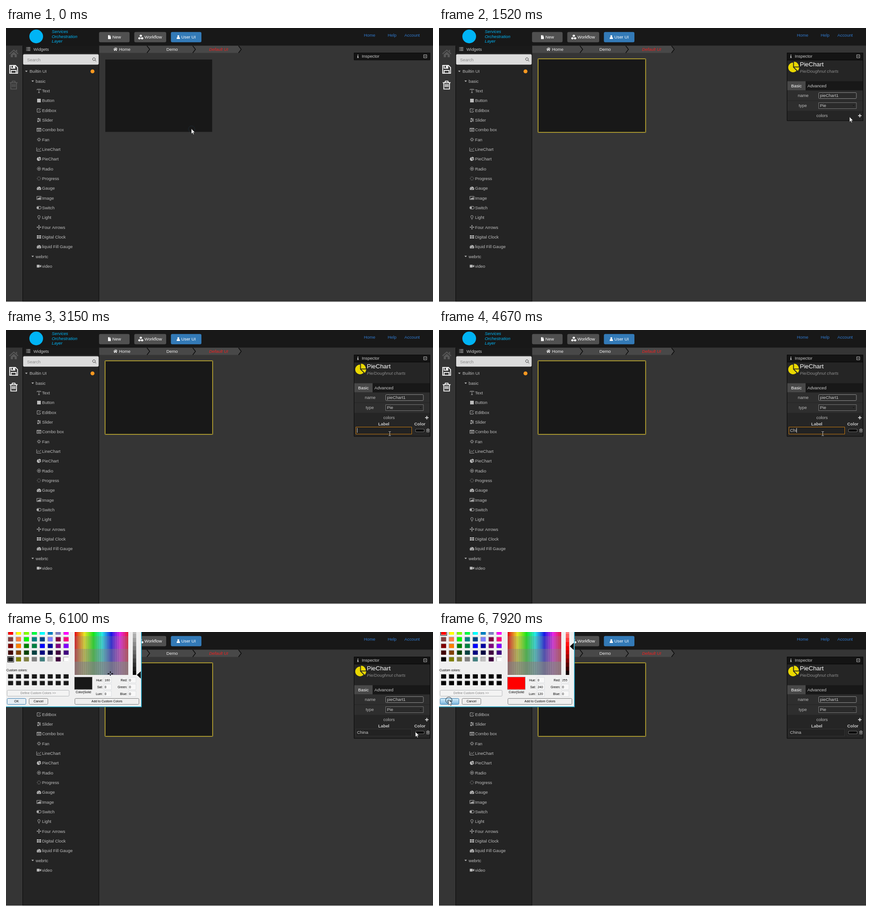
Recreate the animation shown at these times as an HTML page with a canvas. Size 933x600 px, loop 8 s.

```html
<!DOCTYPE html>
<html lang="en">
<head>
<meta charset="utf-8">
<title>Widget editor</title>
<style>
html, body { margin: 0; width: 100%; height: 100%; overflow: hidden; background: #353535; }
canvas { display: block; }
</style>
</head>
<body>
<canvas id="stage" width="933" height="600"></canvas>
<script>
const ctx = document.getElementById('stage').getContext('2d');
const LOOP = 8000;

// Icons are centred on 0,0 and about 10 px wide: [filled path, stroked path]
const spokes = 'M0-4.3V-2.8M0 2.8V4.3M-4.3 0h1.5M2.8 0h1.5M-3-3l1 1M2 2l1 1M-3 3l1-1M2-2l1-1';
const gauge = ['M-4.2 3.5A4.8 4.8 0 1 1 4.2 3.5ZM-.8 2.5h1.6L1.5-1.5ZM-3.6 0h1.2v1.2h-1.2zM2.4 0h1.2v1.2H2.4zM-2-2.8h1.2v1.2H-2z', ''];
const icons = {
  text: ['', 'M-4-3.5H4M0-3.5V4M-4-3.5v2M4-3.5v2M-2 4H2'],
  button: ['M-4-4H4V4H-4Z', ''],
  edit: ['', 'M2-3.5H-4V4H3V1M-1 1.5L4.5-4'],
  slider: ['M-2-4.4h2v2.8h-2zM1-1.4h2v2.8h-2zM-3 1.6h2v2.8h-2z', 'M-4-3H4M-4 0H4M-4 3H4'],
  combo: ['', 'M-4.5-3.5h9v7h-9zM-4.5-2.5h9M-3-.3h6M-3 1.6h6'],
  fan: ['', spokes + 'M2.3 0A2.3 2.3 0 1 1 2.3-.01'],
  line: ['', 'M-5-4V4H5M-3.5 1.5L-1-1 1 1 4.5-3'],
  pie: ['M-.5 0L2.4 2.9A4.1 4.1 0 1 1-.5-4.1ZM.5 0H4.6A4.1 4.1 0 0 1 3.4 2.9ZM4.3-.7H.2V-4.8A4.1 4.1 0 0 1 4.3-.7Z', ''],
  radio: ['M1.5 0A1.5 1.5 0 1 1 1.5-.01Z', 'M3.7 0A3.7 3.7 0 1 1 3.7-.01'],
  progress: ['', spokes],
  gauge,
  image: ['M-3.5 2.5L-1.5-.5 0 1 2-2 3.5 0V2.5Z', 'M-4.7-3.5h9.4v7h-9.4z'],
  switch: ['M0 0A2.2 2.2 0 1 1 0-.01Z', 'M-2-3H2A3 3 0 0 1 2 3H-2A3 3 0 0 1-2-3'],
  light: ['', 'M-1.2 2C-1.2.5-2.6 0-2.6-1.7A2.6 2.6 0 0 1 2.6-1.7C2.6 0 1.2.5 1.2 2ZM-1 4H1'],
  arrows: ['M0-5l1.8 2h-3.6zM0 5l1.8-2h-3.6zM-5 0l2 1.8v-3.6zM5 0l-2 1.8v-3.6z', 'M-4 0H4M0-4V4'],
  clock: ['M-4.5-3.5h4v3h-4zM.5-3.5h4v3h-4zM-4.5.5h4v3h-4zM.5.5h4v3h-4z', ''],
  video: ['M-4.7-3h6.2v6h-6.2zM1.8-.5L4.8-3V3L1.8.5z', ''],
  home: ['M0-4.5L5 0 4.3.7 0-3.1-4.3.7-5 0ZM0-2L3.3 1V4H.9V1.5H-.9V4H-3.3V1ZM2.4-4H3.6V-1.5L2.4-2.6Z', ''],
  trash: ['', 'M-4.3-2.7H4.3M-3.1-2.7V4.3H3.1V-2.7M-1.5-1.2V2.3M0-1.2V2.3M1.5-1.2V2.3M-2-2.7L-1.4-4.3H1.4L2-2.7'],
  save: ['M-.8-3.7H.8V-1.8H-.8Z', 'M-4.3-4.3H2L4.3-2V4.3H-4.3ZM-2.7 4.3V1.2H2.7V4.3M-2.7-4.3V-1.2H1.3V-4.3'],
  user: ['M0-4.2A2.1 2.1 0 1 1 0 0 2.1 2.1 0 1 1 0-4.2ZM-3.5 4V2A2 2 0 0 1-1.5 0H1.5A2 2 0 0 1 3.5 2V4Z', ''],
  file: ['M-3.2-4.5H.5V-1.5H3.2V4.5H-3.2ZM1.2-4.5L3.2-2.2H1.2Z', ''],
  cubes: ['M0-5L2.3-3.9V-1.5L0-.4-2.3-1.5V-3.9ZM-2.7 0L-.4 1.1V3.5L-2.7 4.6-5 3.5V1.1ZM2.7 0L5 1.1V3.5L2.7 4.6.4 3.5V1.1Z', ''],
  list: ['', 'M-4.5-3.4h1.4M-2.3-3.4h7M-4.5-1.1h1.4M-2.3-1.1h7M-4.5 1.2h1.4M-2.3 1.2h7M-4.5 3.5h1.4M-2.3 3.5h7'],
  search: ['', 'M2.2-.8A3 3 0 1 1 2.2-.81M1.3 1.3L4 4'],
  info: ['M-1-4H1V-2.2H-1ZM-1.6-1H1V2.6H1.7V4H-1.7V2.6H-1V.3H-1.6Z', ''],
  collapse: ['', 'M-3.3-3.3H3.3V3.3H-3.3ZM-1.8 0H1.8'],
  plus: ['M-1-3.7H1V-1H3.7V1H1V3.7H-1V1H-3.7V-1H-1Z', ''],
  down: ['M-3-1.5H3L0 1.8Z', '']
};
for (const name in icons) icons[name] = icons[name].map(d => new Path2D(d));

const widgets = [
  ['text', 'Text'], ['button', 'Button'], ['edit', 'Editbox'], ['slider', 'Slider'],
  ['combo', 'Combo box'], ['fan', 'Fan'], ['line', 'LineChart'], ['pie', 'PieChart'],
  ['radio', 'Radio'], ['progress', 'Progress'], ['gauge', 'Gauge'], ['image', 'Image'],
  ['switch', 'Switch'], ['light', 'Light'], ['arrows', 'Four Arrows'],
  ['clock', 'Digital Clock'], ['gauge', 'liquid Fill Gauge']
];

const basicColors = [
  'f00 ff0 80ff00 00ff40 0ff 0080c0 8080c0 f0f',
  '804040 ff8040 0f0 008080 004080 8080ff 800040 ff0080',
  '800000 ff8000 008000 008040 00f 0000a0 800080 8000ff',
  '400000 804000 004000 004040 000080 000040 400040 400080',
  '000 808000 808040 808080 408080 c0c0c0 400040 fff'
].map(row => row.split(' ').map(c => '#' + c));

const steps = [
  [0, 160, 2], [460, 1370, 7], [1520, 2440, 7], [2590, 3150, 5], [5490, 5950, 4],
  [6100, 6520, 4], [6640, 7060, 4], [7210, 7610, 4], [7760, 7920, 2]
].flatMap(([a, b, n]) => Array.from({ length: n }, (_, i) => a + (b - a) * i / (n - 1)));

const pointerKeys = [
  [0, 405, 220.5], [160, 442, 214], [460, 442, 214], [1520, 897, 194.5], [1820, 923, 190],
  [2440, 923, 190], [3010, 838.5, 227], [5480, 838.5, 227], [5780, 901, 217.5],
  [5950, 901, 217.5], [6100, 894.5, 218.5], [6520, 287, 144], [6920, 14, 4.5],
  [7610, 14, 5], [7920, 21, 148.5]
];
const clicks = [[0, 460], [1970, 2120], [7060, 7200], [7920, LOOP]];
const keyTimes = [3960, 4420, 4590, 4770, 4940];

function pointerAt(t) {
  const held = steps.filter(s => s <= t + 1).pop();
  const i = pointerKeys.findIndex(k => k[0] > held);
  if (i < 0) return pointerKeys[pointerKeys.length - 1].slice(1);
  const [t0, x0, y0] = pointerKeys[i - 1], [t1, x1, y1] = pointerKeys[i];
  const u = (held - t0) / (t1 - t0), e = u * u * (3 - 2 * u);
  return [x0 + (x1 - x0) * e, y0 + (y1 - y0) * e];
}

function box(x, y, w, h, fill, stroke, radius = 0, width = 1) {
  ctx.beginPath();
  ctx.roundRect(x, y, w, h, radius);
  if (fill) { ctx.fillStyle = fill; ctx.fill(); }
  if (stroke) { ctx.strokeStyle = stroke; ctx.lineWidth = width; ctx.stroke(); }
}

function shape(path, x, y, fill, stroke, width = 1) {
  ctx.save();
  ctx.translate(x, y);
  const p = typeof path === 'string' ? new Path2D(path) : path;
  if (fill) { ctx.fillStyle = fill; ctx.fill(p, 'evenodd'); }
  if (stroke) { ctx.strokeStyle = stroke; ctx.lineWidth = width; ctx.stroke(p); }
  ctx.restore();
}

function circle(x, y, r, fill, stroke) {
  box(x - r, y - r, 2 * r, 2 * r, fill, stroke, r);
}

function icon(name, x, y, color, scale = 1) {
  ctx.save();
  ctx.translate(x, y);
  ctx.scale(scale, scale);
  const [solid, outline] = icons[name];
  shape(solid, 0, 0, color);
  shape(outline, 0, 0, null, color, 0.9);
  ctx.restore();
}

// y is the middle of the capitals
function text(s, x, y, color, { size = 9.33, style = '', align = 'left' } = {}) {
  ctx.font = `${style} ${size}px "Liberation Sans", Arial, sans-serif`;
  ctx.textAlign = align;
  ctx.fillStyle = color;
  ctx.fillText(s, x, y + size * 0.36);
}

function drawHeader() {
  box(0, 0, 933, 38.5, '#181818');
  circle(66, 18.5, 15, '#00b4f5');
  ['Services', 'Orchestration', 'Layer'].forEach((s, i) =>
    text(s, 100, 7.5 + i * 10.7, '#00b4f5', { style: 'italic' }));

  const button = (x, w, fill) => box(x, 8.8, w, 22.4, fill, null, 3);
  button(203.3, 66.7, '#505050');
  icon('file', 226, 20, '#fff', 0.95);
  text('New', 232.5, 20, '#fff');
  button(280.3, 69.7, '#505050');
  icon('cubes', 294.5, 20, '#fff', 1.1);
  text('Workflow', 302.5, 20, '#fff');
  button(360.3, 66.7, '#337ab7');
  icon('user', 376.5, 20, '#fff');
  text('User UI', 383, 20, '#fff');

  [['Home', 782], ['Help', 834], ['Account', 870.5]].forEach(([s, x]) => text(s, x, 16, '#2f78cc'));

  shape('M203 39H508L514 46.8 508 54.5H203Z', 0, 0, '#484848');
  for (const x of [308, 408, 508]) shape('M0 39L6 46.8 0 54.5', x, 0, null, '#0c0c0c', 1.5);
  icon('home', 239, 46.5, '#eee', 0.9);
  text('Home', 247, 46.5, '#eee');
  text('Demo', 363, 46.5, '#eee', { align: 'center' });
  text('Default UI', 464.5, 46.5, '#f02020', { style: 'italic', align: 'center' });
}

function drawSidebar(selected) {
  const disabled = '#585858';
  icon('home', 17, 56, disabled, 2);
  icon('save', 16.7, 90.5, '#fff', 2);
  icon('trash', 16.7, 125, selected ? '#fff' : disabled, 2);

  box(36.5, 39, 166.5, 560, '#242424', '#0a0a0a');
  box(37, 39, 165.5, 16, '#1a1a1a');
  icon('list', 48.5, 46, '#ccc');
  text('Widgets', 60, 46.3, '#ccc');
  box(37.4, 57.5, 165.1, 22.7, '#dcdcdc', null, 2.7);
  text('Search', 46, 69.2, '#8a8a8a');
  icon('search', 193, 69, '#222');

  const rowY = i => 137.6 + i * 21.33, color = '#bcbcbc';
  icon('down', 44.5, rowY(-2), color, 0.9);
  text('Builtin UI', 51.5, rowY(-2), color);
  circle(189, 95, 4.3, '#ff9820');
  icon('down', 58.3, rowY(-1), color, 0.9);
  text('basic', 64.7, rowY(-1), color);
  widgets.forEach(([name, label], i) => {
    icon(name, 72, rowY(i), color);
    text(label, 78.7, rowY(i), color);
  });
  icon('down', 58.3, rowY(17), color, 0.9);
  text('webrtc', 64.7, rowY(17), color);
  icon('video', 72, rowY(18), color);
  text('video', 78.7, rowY(18), color);
}

function drawCanvasItem(selected) {
  box(217, 69, 233.5, 158.5, '#181818');
  if (!selected) return;
  box(216.5, 67.5, 235, 161, '#181818', '#e8d87030', 1, 3);
  box(216.5, 67.5, 235, 161, null, '#d8bc20', 1);
}

function drawInspector(t, selected) {
  const hasRow = t >= 2120;
  if (selected) {
    box(760.5, 70, 166, hasRow ? 163 : 133, '#252525', '#080808');
    icon('pie', 775, 86.3, '#ead800', 2.6);
    text('PieChart', 788.5, 79.3, '#fff', { size: 13.33 });
    text('Pie/Doughnut charts', 788.5, 94.5, '#8c8c8c', { style: 'italic' });
    box(761, 116.5, 165, 20, '#181818');
    box(761, 116.5, 40, 20, '#484848');
    text('Basic', 769.5, 126.7, '#fff');
    text('Advanced', 805, 126.7, '#ccc');
    box(761, 137, 165, 21.5, '#2e2e2e');
    box(761, 159.5, 165, 22, '#2e2e2e');
    text('name', 784, 148, '#bbb');
    text('type', 786, 170, '#bbb');
    box(829.5, 141.5, 82.5, 13, '#2a2a2a', '#8c8c8c', 2);
    text('pieChart1', 832.5, 148, '#ccc');
    box(829.5, 163.5, 82.5, 13, '#2a2a2a', '#747474');
    text('Pie', 832.5, 170, '#ccc');
    icon('down', 906, 170, '#111', 0.6);
    text('colors', 837, 191.7, '#bbb', { align: 'center' });
    icon('plus', 919.5, 192, '#ccc');
    if (hasRow) drawColorRow(t);
  }
  box(760.5, 54.5, 166, 15.5, '#141414', '#080808');
  icon('info', 769, 62, '#ccc', 0.9);
  text('Inspector', 777.5, 61.8, '#ccc');
  icon('collapse', 916, 62, '#ccc');
}

function drawColorRow(t) {
  const labelFocus = t >= 3000 && t < 5780;
  const colorFocus = t >= 5780 && t < 6090;
  const label = 'China'.slice(0, keyTimes.filter(k => t >= k).length);
  text('Label', 825.5, 205.3, '#ccc', { style: 'bold', align: 'center' });
  text('Color', 904.3, 205.3, '#ccc', { style: 'bold', align: 'center' });
  box(764.5, 212.5, 122, 15.5, '#222', labelFocus ? '#c87a10' : '#343434');
  text(label, 767, 220, '#ccc');
  if (labelFocus && !(t >= 3530 && t < 3960)) {
    box(767 + ctx.measureText(label).width, 214.5, 1, 10.5, '#ccc');
  }
  box(891.5, 212.5, 25.5, 15, '#222', colorFocus ? '#3874bc' : '#303030');
  box(895, 217, 18.5, 6, '#000', '#777');
  icon('trash', 922, 220, '#bbb', 0.85);
}

function cell(x, y, color) {
  box(x - 6, y - 5.5, 12.5, 11, '#fff');
  box(x - 6, y - 5.5, 11.5, 10, '#999');
  box(x - 5, y - 4.5, 10.5, 9, color);
}

function dialogButton(label, x, y, w, border, fill = '#efefef', color = '#000') {
  box(x + 0.5, y + 0.5, w - 1, 13, fill, border, 2);
  text(label, x + w / 2, y + 7, color, { size: 6.9, align: 'center' });
}

function drawDialog(t) {
  const red = t >= 7050, black = t < 6240 ? '#181818' : '#000';
  const small = { size: 6.9 };
  box(0, 0, 296, 164, '#f0f0f0');
  box(295, 0, 1.5, 164.5, '#2ab4d8');
  box(0, 163, 296, 1.5, '#2ab4d8');

  const cellX = i => 10 + i * 17.33;
  basicColors.forEach((row, r) =>
    row.forEach((c, i) => cell(cellX(i), 1.5 + r * 14.6, c === '#000' ? black : c)));
  box(3.5, red ? -5 : 53.5, 13.5, 12.5, null, '#000');
  text('Custom colors:', 1, 83.5, '#000', small);
  for (let i = 0; i < 16; i++) cell(cellX(i % 8), i < 8 ? 97.5 : 112, black);

  dialogButton('Define Custom Colors >>', 2, 127, 136.5, '#b4b8ba', '#f3f3f3', '#838383');
  let okFill = '#e6eef4';
  if (t >= 7910) {
    okFill = ctx.createLinearGradient(0, 145, 0, 159);
    okFill.addColorStop(0, '#d8f0fc');
    okFill.addColorStop(1, '#78b4dc');
  }
  dialogButton('OK', 2, 145, 42, '#3c7fb1', okFill);
  dialogButton('Cancel', 50, 145, 42, '#808080');
  dialogButton('Add to Custom Colors', 150, 145, 141, '#808080');

  // Coarse hue and saturation field, its top lies above the stage
  [[-20, 9], [9, 37], [37, 65], [65, 94]].forEach(([top, bottom]) => {
    const sat = (94 - (top + bottom) / 2) / 125 * 100;
    for (let x = 0; x < 117; x += 3.9) {
      box(150 + x, top, 4, bottom - top, `hsl(${x / 117 * 360} ${sat}% 50%)`);
    }
  });
  if (!red) shape('M-6 0h4M2 0h4M0-5v3M0 2v2', 228, 91.5, null, '#000', 2);

  for (let y = -5; y < 94; y += 9) {
    const lum = (94 - y - 4.5) / 125 * 100;
    box(277, y, 7.5, Math.min(9, 94 - y), `hsl(0 ${red ? 100 : 0}% ${Math.max(0, lum)}%)`);
  }
  shape('M286 0L294.5-8V8Z', 0, red ? 31.5 : 94, '#000');

  box(149.5, 98.5, 39, 27.5, red ? '#f00' : black, '#a0a0a0');
  text('Color|Solid', 169, 132, '#000', { size: 6.9, align: 'center' });
  const fields = [
    ['Hue:', red ? 0 : 160, 'Red:', red ? 255 : 0],
    ['Sat:', red ? 240 : 0, 'Green:', 0],
    ['Lum:', red ? 120 : 0, 'Blue:', 0]
  ];
  fields.forEach((row, r) => [0, 2].forEach(i => {
    const x = i ? 267.5 : 214, y = 105.2 + r * 15;
    text(row[i], x - 2.5, y, '#000', { size: 6.9, align: 'right' });
    box(x, y - 6, 16.5, 12, '#f8f8f8', '#dcdfe2');
    text(row[i + 1], x + 1.5, y, '#000', small);
  }));
}

function drawPointer(t) {
  const [x, y] = pointerAt(t);
  if (clicks.some(([a, b]) => t >= a && t < b)) circle(x + 0.5, y + 1, 7, null, '#1c2830');
  if (t >= 2120 && t < 5950 && x < 887 && y > 212) {
    shape('M-2.5-4.5h2L0-4 .5-4.5h2M0-4V4M-2.5 4.5h2L0 4 .5 4.5h2', x, y, null, '#ccc', 0.9);
  } else {
    shape('M0 0V11.3L2.6 8.9 4.3 12.8 6 12.1 4.3 8.3H7.8Z', x, y, '#fff', '#111', 0.6);
  }
}

function draw() {
  const t = performance.now() % LOOP;
  const selected = t >= 460;
  box(0, 0, 933, 600, '#353535');
  drawHeader();
  drawSidebar(selected);
  drawCanvasItem(selected);
  drawInspector(t, selected);
  box(0, 599, 933, 1, '#e4e4e4');
  if (t >= 6090) drawDialog(t);
  drawPointer(t);
  requestAnimationFrame(draw);
}
draw();
</script>
</body>
</html>
```
